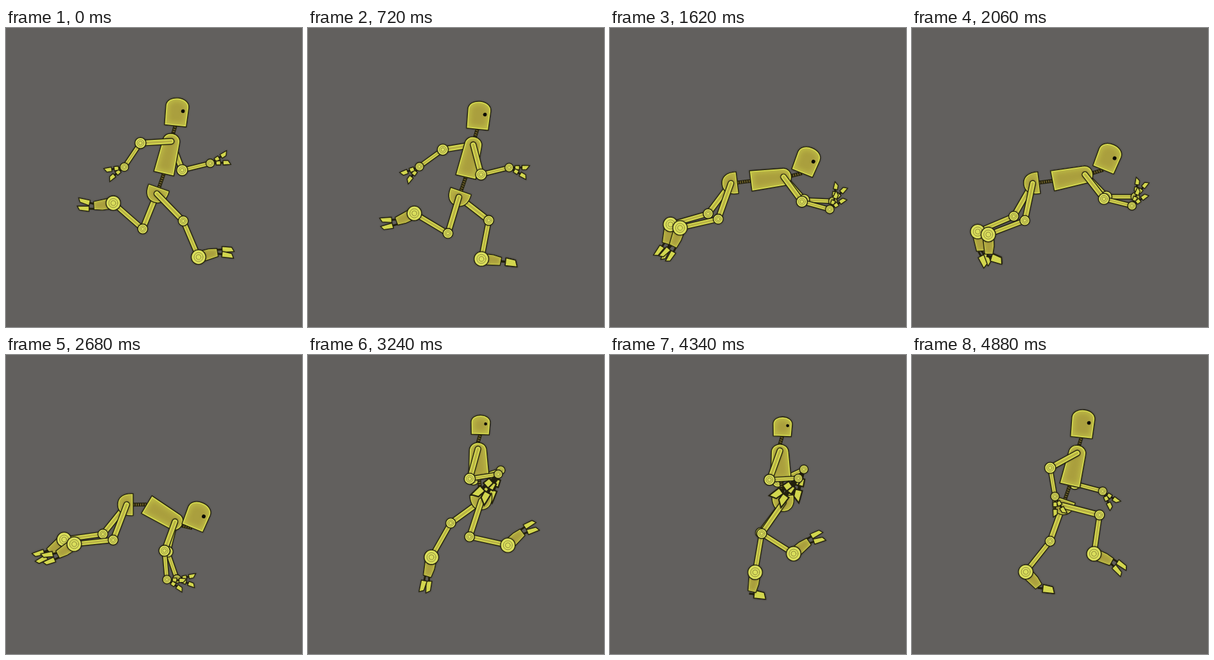
Recreate the animation shown at these times as an HTML page with a canvas. Size 461 by 465 pixels, loop 4.96 s.

```html
<!DOCTYPE html>
<html lang="en">
<head>
<meta charset="utf-8">
<title>Wooden puppet changing gaits</title>
<style>
html, body { margin: 0; width: 100%; height: 100%; overflow: hidden; background: #62605e; }
canvas { display: block; }
</style>
</head>
<body>
<canvas id="stage" width="461" height="465"></canvas>
<script>
const ctx = document.getElementById('stage').getContext('2d');
const LOOP = 4960, CYCLE = 460, TICK = 20, GROUND = 358;
const DARK = '#24220f', LIGHT = '#d2d64e', MID = '#aa9f3e', RING = '#dadf5c';
const TURN = 2 * Math.PI, RAD = TURN / 360;

const mix = (a, b, w) => a + (b - a) * w;
const ease = s => {
  s = Math.min(1, Math.max(0, s));
  return s * s * (3 - 2 * s);
};

// Mean plus harmonics, each with an amplitude and the phase of its peak.
const swing = (p, mean, ...waves) => waves.reduce(
  (sum, [amp, peak], i) => sum + amp * Math.cos(TURN * (i + 1) * (p - peak)), mean);

// A gait maps a phase to groups of numbers, angles in degrees:
// build: spine, torso and neck length, head width and height, hand scale
// body: x, y, spine, torso, neck, head
// legs: thigh, shin, foot against shin    arms: upper, fore, hand against fore
const gait = (build, body, leg, arm) => p =>
  [build, body(p), leg(p, 0), leg(p, 1), arm(p, 0), arm(p, 1)];

const run = gait(
  [33, 67, 9.5, 36, 47, 1],
  p => [235, swing(p, 248.5, [0, 0], [14.5, .07]), -71, -77, -72, -84],
  (p, far) => {
    p += far / 2;
    return [
      swing(p, 66.4, [46.5, .419], [13, -.022], [12, -.047]),
      swing(p, 135, [73.5, .527], [22, .091], [19.6, .096]),
      swing(p, -77, [20, .602], [14.4, -.047])
    ];
  },
  (p, far) => {
    p += far / 2;
    return [
      swing(p, 123, [54, -.012]),
      swing(p, 57, [75.6, .021], [13, .137], [10.7, .115]),
      swing(p, 14, [0, 0], [0, 0], [28, -.048])
    ];
  });

const gallop = gait(
  [31, 67, 14, 37, 46, .95],
  p => [188, swing(p, 236, [5.7, 0]), swing(p, -4, [4, .4]),
    swing(p, 8.4, [24, .4]), swing(p, -6, [14.8, .4]), -68],
  (p, far) => [
    swing(p, 92.4 + 18 * far, [31, .2]),
    swing(p, 153.5 - 2 * far, [29.6, .22]),
    swing(p, -71 - 5 * far, [54, .25])
  ],
  (p, far) => [
    swing(p, 88.8 - 6 * far, [36.8, .5]),
    swing(p, 59 - 14 * far, [45, .5]),
    -66
  ]);

const strut = gait(
  [36, 58, 10, 30, 33, 1.65],
  p => [270, swing(p, 234, [0, 0], [8, 0]), -96, -92, -66, -88],
  (p, far) => {
    p += far / 2;
    return [swing(p, 126, [29.8, .43]), swing(p, 66, [55, .319]), swing(p, -36, [38, .113])];
  },
  (p, far) => {
    p += far / 2;
    return [swing(p, 102, [17, 0]), swing(p, -14, [24, 0]), 138];
  });

// start and end of each change, then the gait and the time of its phase zero
const changes = [
  [1240, 1640, gallop, 2060],
  [2720, 3160, strut, 3800],
  [4360, 4780, run, LOOP]
];

function poseAt(t) {
  let pose = run(t / CYCLE), before = run, zeroBefore = 0;
  for (const [start, end, next, zero] of changes) {
    if (t < start) break;
    const w = ease((t - start) / (end - start));
    const from = before((t - zeroBefore) / CYCLE), to = next((t - zero) / CYCLE);
    pose = from.map((group, i) => group.map((v, k) => mix(v, to[i][k], w)));
    before = next;
    zeroBefore = zero;
  }
  return pose;
}

const reach = ([x, y], angle, len) =>
  [x + Math.cos(angle * RAD) * len, y + Math.sin(angle * RAD) * len];

function local([x, y], angle, draw) {
  ctx.save();
  ctx.translate(x, y);
  ctx.rotate(angle * RAD);
  draw();
  ctx.restore();
}

// Fills the current path: soft dark halo, bright rim, dark outline.
function paint(fill, rim = 0) {
  ctx.save();
  ctx.shadowColor = 'rgba(20,18,8,.75)';
  ctx.shadowBlur = 3;
  ctx.fillStyle = fill;
  ctx.fill();
  if (rim) {
    ctx.clip();
    ctx.strokeStyle = ctx.shadowColor = LIGHT;
    ctx.shadowBlur = rim * 2;
    ctx.lineWidth = rim;
    ctx.stroke();
  }
  ctx.restore();
  ctx.strokeStyle = DARK;
  ctx.lineWidth = 1.3;
  ctx.stroke();
}

function poly(points, fill, rim) {
  ctx.beginPath();
  points.forEach(([x, y]) => ctx.lineTo(x, y));
  ctx.closePath();
  paint(fill, rim);
}

function line(a, b, width, color, cap = 'butt') {
  ctx.beginPath();
  ctx.moveTo(...a);
  ctx.lineTo(...b);
  ctx.lineCap = cap;
  ctx.lineWidth = width;
  ctx.strokeStyle = color;
  ctx.stroke();
}

function bar(a, b, width) {
  ctx.shadowColor = 'rgba(20,18,8,.75)';
  ctx.shadowBlur = 2;
  line(a, b, width + 2.4, DARK, 'round');
  ctx.shadowBlur = 0;
  line(a, b, width, LIGHT, 'round');
  line(a, b, width * .4, '#b9b244', 'round');
}

function ring([x, y], r) {
  const circle = k => {
    ctx.beginPath();
    ctx.arc(x, y, r * k, 0, TURN);
  };
  circle(1);
  paint(RING);
  ctx.strokeStyle = '#8a8436';
  ctx.lineWidth = .9;
  for (const k of [.62, .34]) {
    circle(k);
    ctx.stroke();
  }
}

function link(a, b) {
  line(a, b, 6, DARK);
  ctx.setLineDash([1.5, 2]);
  line(a, b, 3.5, '#77682c');
  ctx.setLineDash([]);
}

// Block standing on its base with a rounded top.
function dome(base, top, h) {
  const shoulder = -h + base * .5;
  ctx.beginPath();
  ctx.moveTo(-base / 2, 0);
  ctx.lineTo(-top / 2, shoulder);
  ctx.bezierCurveTo(-top / 2, -h - 1, top / 2, -h - 1, top / 2, shoulder);
  ctx.lineTo(base / 2, 0);
  ctx.closePath();
  paint(MID, 5);
}

function drawHand(wrist, angle, scale) {
  for (const side of [-1, 1]) {
    local(wrist, angle + side * 15 / scale, () => {
      ctx.scale(scale, scale);
      line([4, 0], [26, 0], 3, DARK);
      poly([[9, -3], [16, -3.3], [16, 3.3], [9, 3]], LIGHT);
      poly([[20, -3.4], [28, -3.2], [32, side * 3], [27, 3.2], [20, 3.4]], LIGHT);
    });
  }
}

function drawArm(shoulder, [upper, fore, hand], scale) {
  const elbow = reach(shoulder, upper, 48), wrist = reach(elbow, fore, 45);
  bar(shoulder, elbow, 7.5);
  bar(elbow, wrist, 5.5);
  drawHand(wrist, fore + hand, scale);
  ring(elbow, 8.6);
  ring(wrist, 6.6);
}

// Toes lie flat and closed on the ground, bent and open in the air.
function drawFoot(ankle, foot) {
  const joint = reach(ankle, foot, 34);
  const lift = ease((GROUND - joint[1]) / 14);
  const toe = mix(6, foot + 14, lift), gap = 4.2 * lift;
  for (const side of [-1, 1]) {
    local(joint, toe + side * 6 * lift, () => {
      ctx.translate(0, side * gap);
      line([-4, 0], [6, 0], 3, DARK);
      const w = 6 - gap * .45;
      poly([[4, -w], [19, 2 - w], [22.5, w], [4, w]], LIGHT);
    });
  }
  local(ankle, foot, () =>
    poly([[5, -8.5], [18, -8.5], [31, -6], [30, 6.5], [5, 8.5]], MID, 2.5));
}

function drawLeg(hip, [thigh, shin, foot]) {
  const knee = reach(hip, thigh, 59), ankle = reach(knee, shin, 61);
  bar(hip, knee, 7.5);
  bar(knee, ankle, 6.5);
  drawFoot(ankle, shin + foot);
  ring(knee, 7.7);
  ring(ankle, 11.3);
}

function drawPelvis(hip, spine) {
  local(hip, spine + 90, () => {
    ctx.beginPath();
    ctx.moveTo(-17, -10);
    ctx.lineTo(17, -10);
    ctx.bezierCurveTo(18, 6, 11, 14, 0, 14);
    ctx.bezierCurveTo(-11, 14, -18, 6, -17, -10);
    ctx.closePath();
    paint(MID, 4);
  });
}

function drawHead(base, angle, w, h) {
  local(base, angle + 90, () => {
    dome(w - 2, w, h);
    ctx.beginPath();
    ctx.arc(w * .26, -h * .51, w * .08, 0, TURN);
    ctx.fillStyle = '#0c0b06';
    ctx.fill();
  });
}

function render(t) {
  const [build, body, legNear, legFar, armNear, armFar] = poseAt(t);
  const [spineLen, torsoLen, neckLen, headW, headH, handScale] = build;
  const [x, y, spine, torso, neck, head] = body;
  const hip = [x, y];
  const waist = reach(hip, spine, spineLen);
  const shoulder = reach(waist, torso, torsoLen * .77);
  const collar = reach(waist, torso, torsoLen);
  const chin = reach(collar, neck, neckLen);

  ctx.fillStyle = '#62605e';
  ctx.fillRect(0, 0, 461, 465);
  drawArm(shoulder, armFar, handScale);
  drawLeg(hip, legFar);
  link(hip, waist);
  drawPelvis(hip, spine);
  link(reach(collar, torso, -4), chin);
  local(waist, torso + 90, () => dome(32, 27, torsoLen));
  drawHead(chin, head, headW, headH);
  drawLeg(hip, legNear);
  drawArm(shoulder, armNear, handScale);
}

function tick() {
  const t = performance.now() % LOOP;
  // the first and last pictures are held a little longer
  render(t < 40 ? 0 : Math.min(Math.floor(t / TICK) * TICK, 4880));
  requestAnimationFrame(tick);
}
tick();
</script>
</body>
</html>
```
